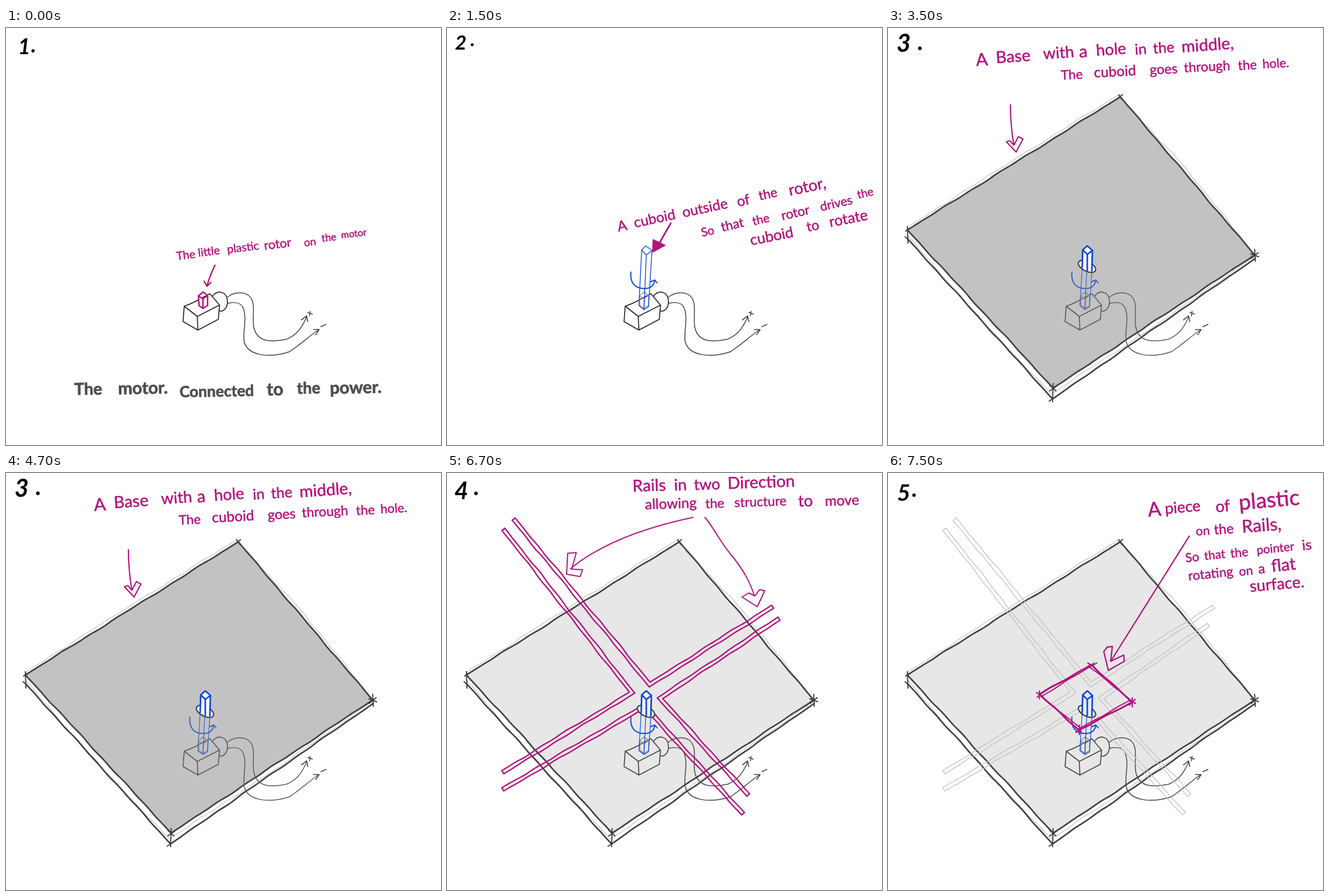
These frames come from a looping animation (764 by 733 pixels, 8 s). An HTML page:

```html
<!DOCTYPE html>
<html lang="en">
<head>
<meta charset="utf-8">
<title>Building a motor rig</title>
<style>
html, body { margin: 0; width: 100%; height: 100%; overflow: hidden; background: #fff; }
svg { display: block; width: 100vw; height: 100vh; stroke-linecap: round; stroke-linejoin: round; }
text { font-family: Lato, "Open Sans", sans-serif; }
.step { font-weight: 700; font-style: italic; }
</style>
</head>
<body>
<svg id="stage" viewBox="0 0 764 733"></svg>
<script>
const PINK = '#b5127c', BLUE = '#0c48de', INK = '#404040', PALE = '#c3c3c3';
const STARTS = [0, 1500, 3500, 5500, 7500], LOOP = 8000;

const path = (d, color, width, fill = 'none') =>
  `<path d="${d}" stroke="${color}" stroke-width="${width}" fill="${fill}"/>`;

// Points along a slightly shaky hand-drawn line
function shaky([x1, y1], [x2, y2], amp = 1) {
  const len = Math.hypot(x2 - x1, y2 - y1), n = Math.ceil(len / 7), out = [];
  for (let i = 0; i <= n; i++) {
    const k = i / n, s = k * len;
    const off = amp * Math.min(1, 6 * k, 6 - 6 * k) *
      (0.6 * Math.sin(s / 9 + x1) + 0.5 * Math.sin(s / 23 + y2));
    out.push([x1 + (x2 - x1) * k - (y2 - y1) / len * off,
              y1 + (y2 - y1) * k + (x2 - x1) / len * off]);
  }
  return out;
}
const toPath = pts => 'M' + pts.map(p => p.map(v => v.toFixed(1)).join(' ')).join('L');
const line = (pts, color, width, amp) =>
  path(toPath(pts.slice(1).flatMap((p, i) => shaky(pts[i], p, amp))), color, width);

// Each word is written as "x baseline size word"
const write = (angle, words, color = PINK, weight = 400, edge = 0.5) =>
  words.split('|').map(item => {
    const [x, y, size, word] = item.split(' ');
    return `<text transform="translate(${x} ${y}) rotate(${angle})" font-size="${size}" ` +
      `font-weight="${weight}" fill="${color}" stroke="${color}" stroke-width="${edge}">${word}</text>`;
  }).join('');
const step = (n, x, y, size, dotX, dotY) =>
  `<text class="step" font-size="${size}"><tspan x="${x}" y="${y}">${n}</tspan><tspan x="${dotX}" y="${dotY}">.</tspan></text>`;

const motor = color =>
  path('M341 476Q330 483 313 489L311 516 337 531 373 512 375 487 336 507 313 489M336 507L337 531' +
    'M341 476L358 467 375 487M363 471C368 465 374 463 379 465C387 467 389 475 389 483Q388 495 378 498L375 497', color, 1.7);
const wires = color =>
  path('M389 473C400 464 417 463 426 470C440 481 432 505 435 525C440 550 460 554 493 547C510 540 520 527 528 508' +
    'M390 484C402 481 412 483 416 491C424 510 416 530 418 550C424 578 465 580 498 569C512 560 530 544 548 531', color, 1.5) +
  path('M519 513L528 506 530 516M540 530L550 530 544 539M530 500L538 503M534 498L533 506M553 525L562 521', INK, 1.6);
const rotor = (color, width, fill) =>
  path('M338 471L346 464 354 470 354 488 346 493 339 488ZL338 471 346 476 354 470M346 476V493', color, width, fill);
const cuboid = () =>
  path('M342 390L349 383 360 391 350 399ZL337 488 346 495 354 490 360 391M350 399L346 495', BLUE, 1.4);
const shaft = color => path('M341 422L337 488 346 495 354 490 358 428M349 427L346 495', color, 1.2);
const spin = color =>
  path('M323 429C321 448 330 458 347 458C357 458 363 453 365 444M358 446L365 443 369 448', color, 2);
const hole = fill =>
  `<ellipse cx="349.5" cy="419" rx="16.5" ry="8.5" transform="rotate(27 349.5 419)" fill="${fill}" stroke="${INK}" stroke-width="2.2"/>`;
const tip = fill =>
  path('M342 390L350 383 359 391 358 426 350 427 341 420Z', 'none', 0, fill) +
  path('M341 421L342 390 350 383 359 391 358 427M342 390L350 398 359 391M350 398V426', BLUE, 2.8);

const back = [408, 121], right = [644, 399], front = [290, 633], left = [34, 355];
function base(fill) {
  const corners = [back, right, front, left, back];
  return path(toPath(corners), 'none', 0, fill) +
    line([[36, 349], [222, 231], [404, 118], [520, 243], [642, 396]], PALE, 1.2, 1.2) +
    line([[35, 365], [150, 500], [287, 643], [470, 523], [640, 404]], PALE, 1.2, 1.2) +
    line(corners, INK, 2.7, 0.8) +
    line([[34, 370], [289, 652], [645, 405]], INK, 2.7, 0.8) +
    path('M403 124L412 117M405 117L411 126M34 349L35 378M31 357L37 352M30 367L37 373M290 625L289 657' +
      'M284 638L297 629M283 656L297 647M284 628L295 638M644 389L645 410M638 405L650 395M637 397L651 402', INK, 2);
}

// A bent rail drawn as a closed outline around a centre line
function rail(a, b, c, color, width, half) {
  const normal = (p, q) => {
    const l = Math.hypot(q[0] - p[0], q[1] - p[1]);
    return [(p[1] - q[1]) / l, (q[0] - p[0]) / l];
  };
  const m = normal(a, b), n = normal(b, c), dot = 1 + m[0] * n[0] + m[1] * n[1];
  const miter = [(m[0] + n[0]) / dot, (m[1] + n[1]) / dot];
  const side = d => [[a, m], [b, miter], [c, n]].map(([p, v]) => [p[0] + v[0] * d, p[1] + v[1] * d]);
  const near = side(half), far = side(-half).reverse();
  return line([...near, ...far, near[0]], color, width, 0.9);
}
const rails = (color, width, half, end) =>
  rail([117, 81], [356, 372], [572, 235], color, width, half) +
  rail([99, 99], [325, 386], [98, 526], color, width, half) +
  rail(end, [374, 396], [529, 566], color, width, half) +
  rail([98, 556], [347, 410], [520, 599], color, width, half);

const rig = (fill, color, holeFill, blue = BLUE, between = '') =>
  base(fill) + wires(color) + motor(color) + rotor('#8c8c8c', 1.6, 'none') + shaft(blue) +
  spin(blue) + between + hole(holeFill) + tip(holeFill);

const plate = [[357, 337], [429, 403], [335, 452], [266, 389], [357, 337]];

const scenes = [
  step(1, 21, 46, 38, 44, 43) + motor('#222') + wires(INK) + rotor(PINK, 2.6, '#fff') +
  path('M367 417Q359 433 353 453M348 445L353 454 360 447', PINK, 2.4) +
  write(-7, '300 408 20 The|338 402 20 little|389 396 20 plastic|454 390 22 rotor|524 384 19 on|555 376 18 the|589 370 17 motor') +
  write(-1, '120 645 29 The|197 644 30 motor.|305 649 27 Connected|458 646 31 to|511 643 28 the|569 643 30 power.', '#4f4f4f', 700, 0.8),

  step(2, 14, 38, 35, 41, 32) + motor('#222') + wires(INK) + rotor('#a0a0a0', 1.6, 'none') + cuboid() + spin(BLUE) +
  path('M393 343L372 380', PINK, 2.8) + path('M362 372L361 394 383 382Z', PINK, 1.5, PINK) +
  write(-12, '301 358 25 A|330 351 25 cuboid|415 333 25 outside|511 314 25 of|549 303 23 the|602 295 28 rotor,') +
  write(-13, '448 367 21 So|483 358 23 that|538 347 21 the|589 338 23 rotor|657 322 22 drives|722 300 20 the') +
  write(-11, '534 382 26 cuboid|633 358 24 to|673 350 26 rotate'),

  step(3, 15, 42, 43, 52, 39) + rig('#c2c2c2', '#5b5b5b', '#fff', '#3c63c0') +
  path('M215 135Q215 170 221 206M208 200L214 198 221 206 229 191 237 195 225 218Z', PINK, 2.2) +
  write(-4, '155 67 31 A|190 62 29 Base|273 55 28 with|336 52 30 a|366 49 28 hole|434 47 26 in|466 45 26 the|516 43 29 middle,') +
  write(-3, '304 91 23 The|362 87 25 cuboid|460 82 24 goes|520 78 23.5 through|615 74 23 the|658 71 22 hole.'),

  step(4, 13, 46, 42, 47, 39) + rig('#e7e7e7', '#454545', '#f2f2f2', BLUE, rails(PINK, 2.4, 3.2, [583, 256])) +
  path('M432 78Q290 108 217 168M212 141L227 140 219 169 238 170 234 182 210 178Z' +
    'M453 78C470 98 480 122 500 145C522 172 532 192 540 216M518 218L530 211 541 216 549 205 558 207 545 235Z', PINK, 2) +
  write(-2, '326 33 29 Rails|399 31 28 in|434 30 27 two|493 28 29 Direction') +
  write(-2, '348 64 25 allowing|454 62 23 the|505 60 23 structure|617 59 28 to|664 58 25 move'),

  step(5, 16, 49, 40, 42, 42) + rig('#e7e7e7', '#454545', '#ededed', BLUE, rails(PALE, 1.4, 3.4, [563, 267])) +
  line(plate, PINK, 3.2, 0.8) +
  line(plate.map(([x, y]) => [x + (x > 345 ? -3 : 3), y + (y > 395 ? -4 : 4)]), PINK, 2, 0.8) +
  path('M356 340L367 334', INK, 1.6) +
  path('M351 334L363 342M352 342L362 334M424 408L434 398M423 400L435 405M429 395V411' +
    'M330 456L341 448M331 448L340 456M336 443V460M261 386L272 393M262 394L271 386M266 383V397', PINK, 2.2) +
  path('M529 111L393 328M379 314L385 306 394 305 391 331 414 320 415 331 387 347Z', PINK, 2.3) +
  write(-5, '457 77 35 A|487 72 27 piece|576 69 28 of|617 65 38 plastic') +
  write(-4, '541 110 22 on|573 108 24 the|622 105 31 Rails,') +
  write(-6, '523 157 22 So|556 153 21 that|602 149 22 the|648 143 21 pointer|728 136 25 is') +
  write(-6, '528 189 23 rotating|617 181 22 on|651 177 24 a|674 174 30 flat') +
  write(-5, '636 209 28 surface.')
];

const stage = document.getElementById('stage');
stage.innerHTML = scenes.map(s => `<g visibility="hidden">${s}</g>`).join('');
const groups = [...stage.children];
const origin = performance.now();

function draw(now) {
  const time = Math.max(0, now - origin) % LOOP;
  const current = STARTS.filter(t => t <= time).length - 1;
  groups.forEach((g, i) => g.setAttribute('visibility', i === current ? 'visible' : 'hidden'));
  requestAnimationFrame(draw);
}
draw(origin);
</script>
</body>
</html>
```
